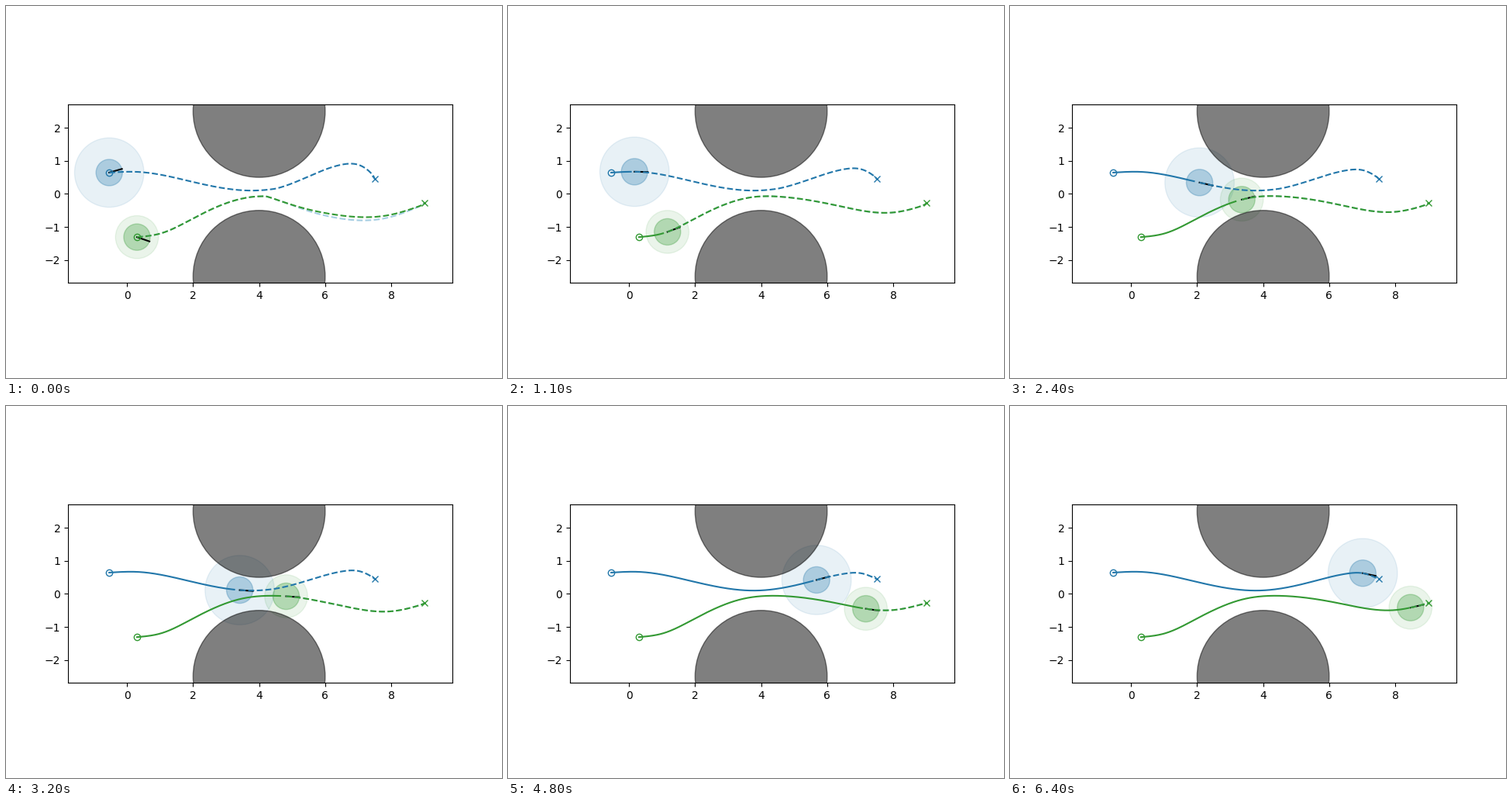
Animation of 640 by 480 pixels, one loop 6.5 s. Source, as a matplotlib script:

```python
import numpy as np
import matplotlib.pyplot as plt
from matplotlib.animation import FuncAnimation
from matplotlib.patches import Circle

FRAMES, STEP = 65, 100
RADIUS = 0.4


def spline(points):
    """Natural cubic spline y(x) through a few key points."""
    x, y = np.array(points, float).T
    n, h = len(x), np.diff(x)
    d = np.diff(y) / h
    a, b = np.eye(n), np.zeros(n)
    for i in range(1, n - 1):
        a[i, i - 1:i + 2] = h[i - 1], 2 * (h[i - 1] + h[i]), h[i]
        b[i] = 6 * (d[i] - d[i - 1])
    m = np.linalg.solve(a, b)

    def value(q):
        i = np.clip(np.searchsorted(x, q, side="right") - 1, 0, n - 2)
        u = q - x[i]
        slope = d[i] - h[i] * (2 * m[i] + m[i + 1]) / 6
        return y[i] + u * (slope + u * (m[i] / 2 + u * (m[i + 1] - m[i]) / (6 * h[i])))
    return value


def bump(x, left, right, a, b):
    """Skewed hump of height 1 between left and right."""
    u = np.clip((x - left) / (right - left), 0, 1)
    top = a / (a + b)
    return (u / top)**a * ((1 - u) / (1 - top))**b


def relax(t):
    return max(0, 1 - (t / 4.6)**2)


def settle(t):
    return np.exp(-t / 0.35)


class Agent:
    def __init__(self, ax, color, reach, points, travel, heading, bend):
        self.path = spline(points)
        self.start, self.goal = points[0][0], points[-1][0]
        self.travel = travel
        self.bend = bend
        self.turn = heading - self.tangent(self.start)
        self.discs = [Circle((0, 0), r, color=color, alpha=a)
                      for r, a in ((reach, 0.1), (RADIUS, 0.3))]
        for disc in self.discs:
            ax.add_patch(disc)
        self.nose, = ax.plot([], [], color="black")
        self.trail, = ax.plot([], [], color=color, zorder=2.2)
        self.plan, = ax.plot([], [], "--", color=color, zorder=2.2)
        for (x, y), mark in ((points[0], "o"), (points[-1], "x")):
            ax.plot(x, y, mark, color=color, fillstyle="none", zorder=2.3)

    def pos(self, t):
        dist, tau, power = self.travel
        return self.start + dist * (1 - np.exp(-(t / tau)**power))

    def tangent(self, x):
        return np.arctan2(self.path(x + 0.07) - self.path(x), 0.07)

    def route(self, t, bend):
        now = self.pos(t)
        x = np.linspace(now, self.goal, 300)
        u = np.clip((x - now) / 1.2, 0, 1)
        return x, self.path(x) + u * u * (3 - 2 * u) * bend(x, t)

    def update(self, k):
        t = k * STEP / 1000
        cx = self.pos(t)
        cy = self.path(cx)
        for disc in self.discs:
            disc.center = cx, cy
        angle = self.tangent(cx) + self.turn * np.exp(-4 * t)
        self.nose.set_data([cx, cx + RADIUS * np.cos(angle)],
                           [cy, cy + RADIUS * np.sin(angle)])
        # the trail lags one step behind the agent
        x = np.linspace(self.start, self.pos(t - STEP / 1000), 200) if k else np.array([])
        self.trail.set_data(x, self.path(x))
        self.plan.set_data(*self.route(t, self.bend))


def blue_bend(x, t):
    return 0.14 * (relax(t) + settle(t)) * bump(x, 4.45, 7.5, 1.5, 0.6)


def green_bend(x, t):
    return (-0.075 * relax(t) * bump(x, 3.8, 9, 1, 0.3)
            - 0.3 * settle(t) * bump(x, 4.19, 9, 1.2, 2.2))


def guess_bend(x, t):
    return green_bend(x, t) - 0.1 * settle(t) * bump(x, 4.8, 9, 1.3, 1.3)


fig = plt.figure(figsize=(6.4, 4.8), dpi=100)
ax = fig.add_subplot()
ax.set_aspect("equal")
ax.set_xlim(-1.789, 9.854)
ax.set_ylim(-2.7, 2.7)
ax.set_xticks(range(0, 9, 2))
ax.set_yticks(range(-2, 3))

guess, = ax.plot([], [], "--", color="#a6cee3", zorder=2.1)

blue = Agent(
    ax, "#2277aa", 1.05,
    [(-0.54, 0.645), (0.33, 0.665), (2, 0.36), (3.85, 0.1),
     (5.25, 0.31), (6.55, 0.615), (7.05, 0.62), (7.5, 0.45)],
    (8.4, 4.085, 1.855), 0.28, blue_bend)
green = Agent(
    ax, "#339933", 0.65,
    [(0.3, -1.31), (1.03, -1.195), (1.99, -0.75), (3.38, -0.167),
     (4.55, -0.06), (6.26, -0.277), (8, -0.49), (9, -0.28)],
    (8.9, 3.869, 1.815), -0.33, green_bend)

for y in (2.5, -2.5):
    ax.add_patch(Circle((4, y), 2, color="black", alpha=0.5))


def draw(k):
    blue.update(k)
    green.update(k)
    guess.set_data(*green.route(k * STEP / 1000, guess_bend))
    return []


anim = FuncAnimation(fig, draw, frames=FRAMES, interval=STEP,
                     repeat=True, repeat_delay=0, blit=False)
plt.show()
```
